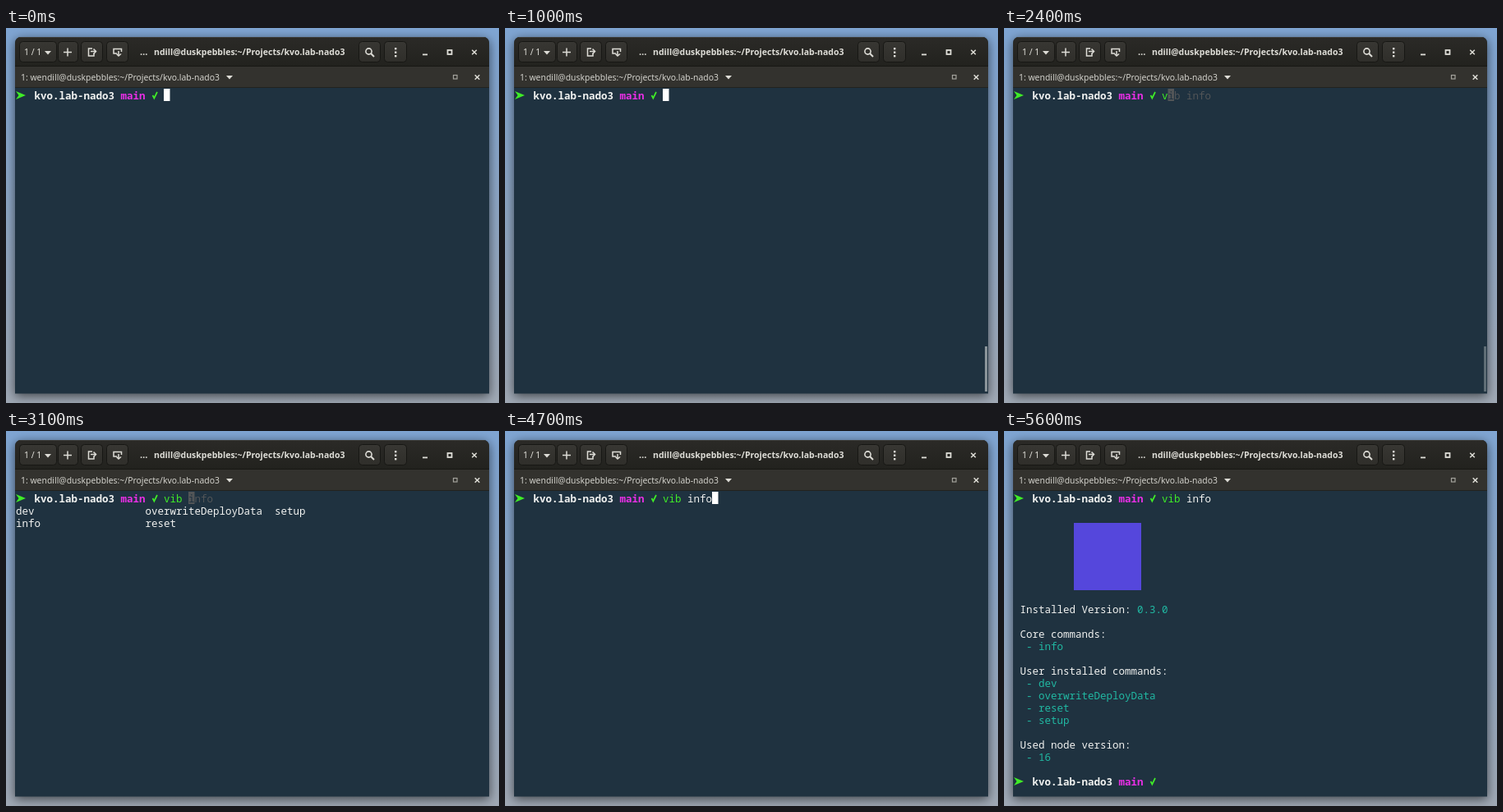
These frames come from a looping animation (600 px wide and 457 px high, 5.9 s). An HTML page with a canvas:

```html
<!DOCTYPE html>
<html lang="en">
<head>
<meta charset="utf-8">
<title>Terminal</title>
<style>
html, body { margin: 0; width: 100%; height: 100%; overflow: hidden; background: #8ea6c4; }
canvas { display: block; }
</style>
</head>
<body>
<canvas id="stage" width="600" height="457"></canvas>
<script>
const ctx = document.getElementById('stage').getContext('2d');
const LOOP = 5900, CELL = 7.5, ROW = 15, LEFT = 12, TOP = 74;
const WHITE = '#f1f2f0', GREEN = '#3fec27', PINK = '#e92fe6', TEAL = '#21b8a2',
      BACK = '#1f3240', GRAY = '#525557', CHROME = '#deddd7';
const MONO = '"Noto Sans Mono", monospace', SANS = '"Noto Sans", sans-serif';
const PROJECT = 'kvo.lab-nado3', COMMAND = 'vib info';
const PLACE = '@duskpebbles:~/Projects/' + PROJECT;

// Command line contents, by the time each one starts.
const TYPING = [[0, ''], [2400, 'v'], [2500, 'vi'], [2700, 'vib'], [2900, 'vib '], [3800, 'vib dev'], [4100, COMMAND]];
const CURSOR_OFF = [[400, 1000], [1600, 2200], [3600, 3800], [5000, 5100], [5600, LOOP]];

const clamp = v => Math.max(0, Math.min(1, v));
const within = (t, a, b) => t >= a && t < b;

function rect(x, y, w, h, color) {
  ctx.fillStyle = color;
  ctx.fillRect(x, y, w, h);
}

function label(s, x, y, font, color = CHROME) {
  ctx.font = font;
  ctx.fillStyle = color;
  ctx.fillText(s, x, y);
}

function line(points, color = CHROME, width = 1.5) {
  ctx.beginPath();
  points.forEach(([x, y], i) => i ? ctx.lineTo(x, y) : ctx.moveTo(x, y));
  ctx.strokeStyle = color;
  ctx.lineWidth = width;
  ctx.stroke();
}

function shape(points, color) {
  ctx.beginPath();
  points.forEach(([x, y]) => ctx.lineTo(x, y));
  ctx.fillStyle = color;
  ctx.fill();
}

function fade(y0, y1, from, to) {
  const g = ctx.createLinearGradient(0, y0, 0, y1);
  g.addColorStop(0, from);
  g.addColorStop(1, to);
  return g;
}

function box(x, y, w, h, color, width = 1.5) {
  ctx.strokeStyle = color;
  ctx.lineWidth = width;
  ctx.strokeRect(x, y, w, h);
}

function button(x, w) {
  ctx.beginPath();
  ctx.roundRect(x + .5, 16.5, w, 25, 4);
  ctx.fillStyle = fade(16, 42, '#383733', '#2f2e2a');
  ctx.fill();
  ctx.strokeStyle = '#171714';
  ctx.lineWidth = 1;
  ctx.stroke();
}

function cross(x, y, r) {
  line([[x - r, y - r], [x + r, y + r]]);
  line([[x + r, y - r], [x - r, y + r]]);
}

const chevron = (x, y) => shape([[x - 4, y - 2], [x + 4, y - 2], [x, y + 2.5]], CHROME);

function drawWindow() {
  rect(0, 0, 600, 457, fade(0, 457, '#7fa5d3', '#a0a9b5'));
  ctx.save();
  ctx.shadowColor = 'rgba(0,0,0,.6)';
  ctx.shadowBlur = 13;
  ctx.shadowOffsetY = 3;
  ctx.beginPath();
  ctx.roundRect(11, 11, 577, 434.5, [7, 7, 0, 0]);
  ctx.fillStyle = BACK;
  ctx.fill();
  ctx.restore();

  ctx.save();
  ctx.clip();
  rect(11, 11, 577, 36, fade(11, 47, '#2b2a27', '#22221e'));
  rect(11, 11, 577, 1, '#3b3a36');
  rect(11, 46, 577, 1, '#171714');
  rect(11, 47, 577, 26, '#33322e');
  rect(11, 72, 577, 1, '#22221f');
  ctx.restore();
}

function drawHeader() {
  [[16, 45], [63, 24], [91, 26], [122, 26], [429, 26], [460, 27]].forEach(b => button(...b));
  label('1 / 1', 22, 33, '10.5px ' + SANS);
  chevron(51, 30);
  line([[70, 29.5], [80, 29.5]]);
  line([[75, 24.5], [75, 34.5]]);

  line([[105, 25], [100.5, 25], [100.5, 34], [107, 34], [107, 31]]);
  line([[103, 28.5], [109, 28.5]]);
  line([[106.5, 25.5], [109.5, 28.5], [106.5, 31.5]]);

  line([[135, 31], [131, 31], [131, 25.5], [140.5, 25.5], [140.5, 29]]);
  line([[137, 28], [137, 34]]);
  line([[134.5, 31.5], [137, 34], [140, 31.5]]);

  label('…', 163, 33, 'bold 11px ' + SANS);
  label('ndill' + PLACE, 180, 33, 'bold 10.5px ' + SANS);

  ctx.beginPath();
  ctx.arc(441.5, 28.5, 3.6, 0, 7);
  ctx.strokeStyle = CHROME;
  ctx.lineWidth = 1.6;
  ctx.stroke();
  line([[444, 31], [448, 35]], CHROME, 2);
  for (const y of [25, 29.5, 34]) rect(473, y - 1, 2.4, 2.4, CHROME);

  rect(507, 31.5, 6, 1.8, CHROME);
  box(537.5, 27, 5, 5, CHROME, 1.8);
  cross(570, 29.5, 2.8);

  label('1: wendill' + PLACE, 18, 63.5, '10.4px ' + SANS, '#d3d2cc');
  chevron(272, 60);
  box(544.5, 57.5, 4.5, 4.5, '#a3a29c', 1.2);
  cross(573.5, 60, 2.8);
}

const colX = col => LEFT + col * CELL;
const rowY = row => TOP + row * ROW;

function write(s, col, row, color = WHITE, bold = false) {
  label(s, colX(col), rowY(row) + 12.5, (bold ? 'bold ' : '') + '12.5px ' + MONO, color);
}

function prompt(row) {
  const y = rowY(row) + 8;
  shape([[12, y - 5], [24, y], [12, y + 5], [15.5, y]], GREEN);
  write(PROJECT, 3, row, WHITE, true);
  write('main', 17, row, PINK, true);
  line([[178.5, y], [180.3, y + 3.5], [184, y - 4]], GREEN, 1.7);
}

function cursor(col, row, color = '#fff') {
  rect(colX(col), rowY(row), CELL, ROW, color);
}

function menu(picked) {
  const items = [['dev', 0, 1], ['info', 0, 2], ['overwriteDeployData', 21, 1], ['reset', 21, 2], ['setup', 42, 1]];
  for (const [name, col, row] of items) {
    const on = name === picked;
    if (on) rect(colX(col), rowY(row), 19 * CELL, ROW, '#fff');
    write(name, col, row, on ? BACK : WHITE);
  }
}

function output() {
  rect(85, 112, 82, 82, '#5547dc');
  write('Installed Version:', 1, 9);
  write('0.3.0', 20, 9, TEAL);
  const lists = [
    [11, 'Core commands:', ['info']],
    [14, 'User installed commands:', ['dev', 'overwriteDeployData', 'reset', 'setup']],
    [20, 'Used node version:', ['16']]
  ];
  for (const [row, head, items] of lists) {
    write(head, 1, row);
    items.forEach((item, i) => write('- ' + item, 2, row + 1 + i, TEAL));
  }
}

function commandLine(t, lit) {
  const typed = TYPING.filter(([start]) => t >= start).pop()[1];
  const hint = typed && t < 3800 ? COMMAND.slice(typed.length) : '';
  const end = 24 + typed.length;
  write(typed.slice(0, 3), 24, 0, GREEN);
  write(typed.slice(3), 27, 0);
  write(hint, end, 0, GRAY);
  if (lit && t < 5000) {
    cursor(end, 0, hint ? GRAY : '#fff');
    write(hint.slice(0, 1), end, 0, BACK);
  }
}

function draw(now) {
  const t = Math.floor(now % LOOP / 100) * 100;
  const lit = !CURSOR_OFF.some(([a, b]) => within(t, a, b));
  drawWindow();
  drawHeader();
  prompt(0);
  commandLine(t, lit);

  if (within(t, 3100, 4700)) menu(t < 3800 ? '' : t < 4100 ? 'dev' : 'info');
  if (t >= 5100) output();
  if (t >= 5200) prompt(23);
  if (t >= 5100 && lit) cursor(t < 5200 ? 0 : 24, 23);

  ctx.globalAlpha = clamp(t / 500) * clamp((2700 - t) / 500);
  rect(584, 388, 3, 55, '#8a949a');
  ctx.globalAlpha = 1;
}

const start = performance.now();
function tick() {
  draw(performance.now() - start);
  requestAnimationFrame(tick);
}
tick();
</script>
</body>
</html>
```
